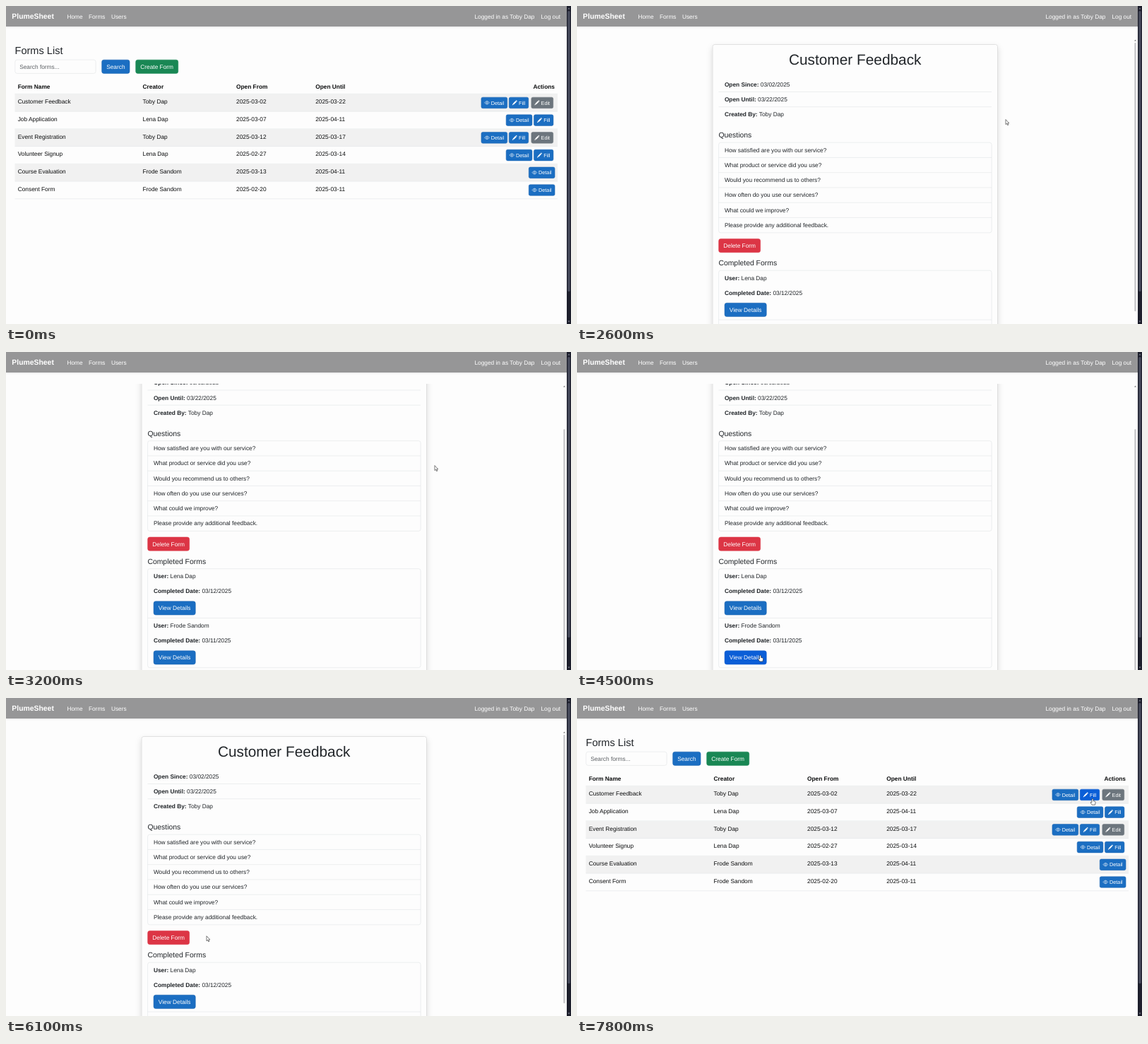
An HTML page for the animation above (8 s loop, 800 by 450 pixels).

```html
<!DOCTYPE html>
<html lang="en">
<head>
<meta charset="utf-8">
<title>Forms</title>
<style>
  html, body { margin: 0; width: 100%; height: 100%; overflow: hidden; background: #fdfdfd; }
  svg { display: block; }
  text { font: 8.333px "Liberation Sans", Arial, sans-serif; fill: #212529; text-rendering: geometricPrecision; white-space: pre; }
  .b { font-weight: bold; }
  .brand { font-size: 10.417px; font-weight: bold; }
  .h1 { font-size: 20.833px; }
  .h3 { font-size: 14.583px; }
  .h5 { font-size: 10.417px; }
  .small { font-size: 7.292px; }
  .white { fill: #fff; }
  .black { fill: #0c0d0e; }
  .hint { fill: #5d6165; }
  .line { stroke: #dfe1e4; stroke-width: .55; fill: none; }
  .primary { fill: #1b6ec2; stroke: #1861ac; }
  .primary.hot { fill: #0b5ed7; stroke: #0a58ca; }
  .success { fill: #198754; stroke: #198754; }
  .danger { fill: #dc3545; stroke: #dc3545; }
  .danger.hot { fill: #bb2d3b; stroke: #b02a37; }
  .secondary { fill: #6c757d; stroke: #6c757d; }
  .btn { stroke-width: .5; }
</style>
</head>
<body>
<svg id="stage" width="800" height="450" viewBox="0 0 800 450"></svg>
<script>
const DURATION = 8000, STEP = 100, SCROLL = 67.5;
const ANN = 'Lena Dap', TOBY = 'Toby Dap', FRODE = 'Frode Sandom';

const text = (x, y, s, cls = '', anchor = 'start') =>
  `<text x="${x}" y="${y}" class="${cls}" text-anchor="${anchor}">${s}</text>`;
const rect = (x, y, w, h, attrs) => `<rect x="${x}" y="${y}" width="${w}" height="${h}" ${attrs}/>`;
const rule = (x1, x2, y) => `<path class="line" d="M${x1} ${y}H${x2}"/>`;
const pair = (x, y, label, value) => text(x, y, `<tspan class="b">${label}:</tspan> ${value}`);

const icons = {
  eye: '<path d="M.6 8Q8-2 15.4 8Q8 18 .6 8Z" fill="none" stroke="#fff" stroke-width="1.3"/>' +
       '<circle cx="8" cy="8" r="2.5" fill="none" stroke="#fff" stroke-width="1.3"/>',
  pencil: '<path d="M12.9.2 15.8 3.1 14.2 4.8 11.2 1.8ZM10.5 2.5 13.5 5.5 5 14 2 11ZM1.4 11.8 4.2 14.6 0 16Z" fill="#fff"/>'
};

const button = (x, y, w, kind, label) =>
  rect(x + .25, y + .25, w - .5, 19.3, `rx="3" class="btn ${kind}"`) +
  text(x + w / 2, y + 12.8, label, 'white', 'middle');

const smallButton = (x, y, w, kind, icon, label) =>
  rect(x + .25, y + .25, w - .5, 15.6, `rx="2.1" class="btn ${kind}"`) +
  `<g transform="translate(${x + 4.7} ${y + 4.3}) scale(.456)">${icons[icon]}</g>` +
  text(x + 14, y + 10.6, label, 'small white');

const detailButton = (x, y) => smallButton(x, y, 37.3, 'primary', 'eye', 'Detail');
const fillButton = (x, y) => smallButton(x, y, 28, 'primary', 'pencil', 'Fill');
const editButton = (x, y) => smallButton(x, y, 31.4, 'secondary', 'pencil', 'Edit');

// Button layouts: owner may edit, open forms may be filled, others only viewed.
const actions = {
  own: y => detailButton(672.7, y) + fillButton(712, y) + editButton(743.6, y),
  open: y => detailButton(707.9, y) + fillButton(747.2, y),
  closed: y => detailButton(740, y)
};

const forms = [
  ['Customer Feedback', TOBY, '2025-03-02', '2025-03-22', 'own'],
  ['Job Application', ANN, '2025-03-07', '2025-04-11', 'open'],
  ['Event Registration', TOBY, '2025-03-12', '2025-03-17', 'own'],
  ['Volunteer Signup', ANN, '2025-02-27', '2025-03-14', 'open'],
  ['Course Evaluation', FRODE, '2025-03-13', '2025-04-11', 'closed'],
  ['Consent Form', FRODE, '2025-02-20', '2025-03-11', 'closed']
];
const columns = [16.7, 193.5, 326, 438.2];

const listPage = () =>
  text(12.5, 68.2, 'Forms List', 'h3') +
  rect(12.8, 76.1, 114.3, 19.3, 'rx="3" class="line"') +
  text(19.2, 88.8, 'Search forms...', 'hint') +
  button(135.4, 75.9, 39.9, 'primary', 'Search') +
  button(183.4, 75.9, 60.6, 'success', 'Create Form') +
  ['Form Name', 'Creator', 'Open From', 'Open Until']
    .map((s, i) => text(columns[i], 117.2, s, 'b black')).join('') +
  text(777, 117.2, 'Actions', 'b black', 'end') +
  rule(12.5, 781, 124.4) +
  forms.map((form, i) => {
    const y = 124.6 + i * 24.72;
    return (i % 2 ? '' : rect(12.5, y, 768.5, 24.6, 'fill="#f1f1f1"')) +
      columns.map((x, c) => text(x, y + 13.5, form[c], 'black')).join('') +
      rule(12.5, 781, y + 24.6) + actions[form[4]](y + 4.3);
  }).join('');

const questions = ['How satisfied are you with our service?', 'What product or service did you use?',
  'Would you recommend us to others?', 'How often do you use our services?',
  'What could we improve?', 'Please provide any additional feedback.'];

const completed = (y, user, date) =>
  pair(208.9, y + 13.4, 'User', user) + pair(208.9, y + 34.3, 'Completed Date', date) +
  button(208.8, y + 45.8, 59.7, 'primary', 'View Details');

const detailPage = () =>
  `<g clip-path="url(#view)"><g id="content">` +
  rect(192, 54.5, 403.5, 468, 'rx="3" fill="#fdfdfd" stroke="#ccc" stroke-width=".55" filter="url(#shadow)"') +
  text(393.7, 82.6, 'Customer Feedback', 'h1', 'middle') +
  pair(208.9, 113.8, 'Open Since', '03/02/2025') + rule(200.5, 587, 121.5) +
  pair(208.9, 135, 'Open Until', '03/22/2025') + rule(200.5, 587, 142.7) +
  pair(208.9, 156.3, 'Created By', TOBY) +
  text(200.4, 186.4, 'Questions', 'h5') +
  rect(200.6, 193.2, 386.5, 127.7, 'rx="3" class="line"') +
  questions.map((q, i) => text(208.9, 206.7 + i * 21.25, q) +
    (i ? rule(200.6, 587, 193.2 + i * 21.25) : '')).join('') +
  button(200.4, 329.2, 59.5, 'danger', 'Delete Form') +
  text(200.4, 367.2, 'Completed Forms', 'h5') +
  rect(200.6, 374.2, 386.5, 140, 'rx="3" class="line"') +
  completed(374.2, ANN, '03/12/2025') + rule(200.6, 587, 444) +
  completed(444.2, FRODE, '03/11/2025') +
  `</g></g>` +
  rect(789.2, 52, 2.6, 380, 'id="thumb" rx="1" fill="#cbcbcd"') +
  '<path d="M788.9 49.6 790.5 47.8 792.1 49.6Z" fill="#777"/>';

const resultPage = () =>
  text(12.5, 68.2, 'Customer Feedback', 'h3') +
  pair(12.5, 88.8, 'User', FRODE) + pair(12.5, 109.7, 'Completed Date', '03/11/2025');

const chrome = () =>
  rect(0, 0, 794, 29, 'fill="#969697" filter="url(#navShadow)"') +
  text(8.3, 18.2, 'PlumeSheet', 'brand white') +
  [[86.4, 'Home'], [116.9, 'Forms'], [148.9, 'Users'], [663.4, 'Logged in as ' + TOBY], [757.4, 'Log out']]
    .map(([x, s]) => text(x, 17.6, s, 'white')).join('') +
  rect(794, 0, 6, 450, 'fill="#1d1f2c"') +
  rect(795.3, 7, 3.4, 397, 'rx="1.5" fill="#474b5c"') +
  '<path d="M795.4 4.6 797 2.6 798.6 4.6ZM795.4 445.6 797 447.6 798.6 445.6Z" fill="#777b8a"/>';

const pointer = (id, d) =>
  `<path id="${id}" d="${d}" fill="#fff" stroke="#222" stroke-width=".6" stroke-linejoin="round"/>`;

const stage = document.getElementById('stage');
stage.innerHTML = `<defs>
    <clipPath id="view"><rect y="45" width="794" height="405"/></clipPath>
    <filter id="shadow"><feDropShadow dx="0" dy="4" stdDeviation="4" flood-opacity=".15"/></filter>
    <filter id="navShadow"><feDropShadow dx="0" dy="1" stdDeviation="1" flood-opacity=".1"/></filter>
  </defs>
  <rect width="800" height="450" fill="#fdfdfd"/>
  <g id="list">${listPage()}</g><g id="detail">${detailPage()}</g><g id="result">${resultPage()}</g>
  ${chrome()}
  <g id="cursor">
    ${pointer('arrow', 'M0 0V7L1.6 5.6 2.7 8.1 3.8 7.6 2.7 5.2H4.8Z')}
    ${pointer('hand', 'M-1 .7Q0-.6 1 .7V3.2L3.4 3.8Q4.3 4.2 4.1 5.4L3.5 8.7H-.8L-3 5.4Q-2.6 4.2-1 5.2Z')}
  </g>`;

const byId = id => document.getElementById(id);
const buttons = [...stage.querySelectorAll('.btn')];
const show = (id, on) => { byId(id).style.display = on ? '' : 'none'; };
const smooth = (t, from, to) => {
  const k = Math.min(1, Math.max(0, (t - from) / (to - from)));
  return k * k * (3 - 2 * k);
};

// Cursor stops: time, x, y.
const path = [
  [0, 751, 186.3], [900, 766, 186.3], [1800, 701.5, 143.2], [2300, 701.5, 143.2],
  [2600, 607, 160.6], [3300, 607, 160.6], [3800, 240, 272], [4200, 259.5, 429.2], [4500, 259.5, 429.2],
  [5100, 276, 354], [5200, 284, 336.8], [6100, 284, 336.8], [6400, 434.5, 293], [7000, 434.5, 293],
  [7500, 762, 160], [7800, 730, 142.5], [8000, 730, 142.5]
];
function cursorAt(t) {
  const i = path.findIndex(stop => stop[0] > t);
  const [t0, x0, y0] = path[i - 1], [t1, x1, y1] = path[i];
  const k = smooth(t, t0, t1);
  return [x0 + (x1 - x0) * k, y0 + (y1 - y0) * k];
}

const pageAt = t => t < 2100 ? 'list' : t < 4600 ? 'detail' : t < 6100 ? 'result' : t < 6800 ? 'detail' : 'list';

function draw(t) {
  const page = pageAt(t);
  for (const id of ['list', 'detail', 'result']) show(id, id === page);

  const scrolled = t < 6100 ? smooth(t, 2900, 3200) : 0;
  byId('content').setAttribute('transform', `translate(0 ${-SCROLL * scrolled})`);
  byId('thumb').setAttribute('y', 52 + 57.3 * scrolled);

  const [x, y] = cursorAt(t);
  const target = buttons.find(b => {
    const r = b.getBoundingClientRect();
    return x > r.left && x < r.right && y > r.top && y < r.bottom;
  });
  buttons.forEach(b => b.classList.toggle('hot', b === target));
  byId('cursor').setAttribute('transform', `translate(${x} ${y})`);
  show('cursor', t >= 100 && (t < 1900 || t >= 2200));
  show('hand', target);
  show('arrow', !target);
}

const start = performance.now();
function tick() {
  const t = (performance.now() - start) % DURATION;
  draw(Math.floor(t / STEP) * STEP);
  requestAnimationFrame(tick);
}
tick();
</script>
</body>
</html>
```
